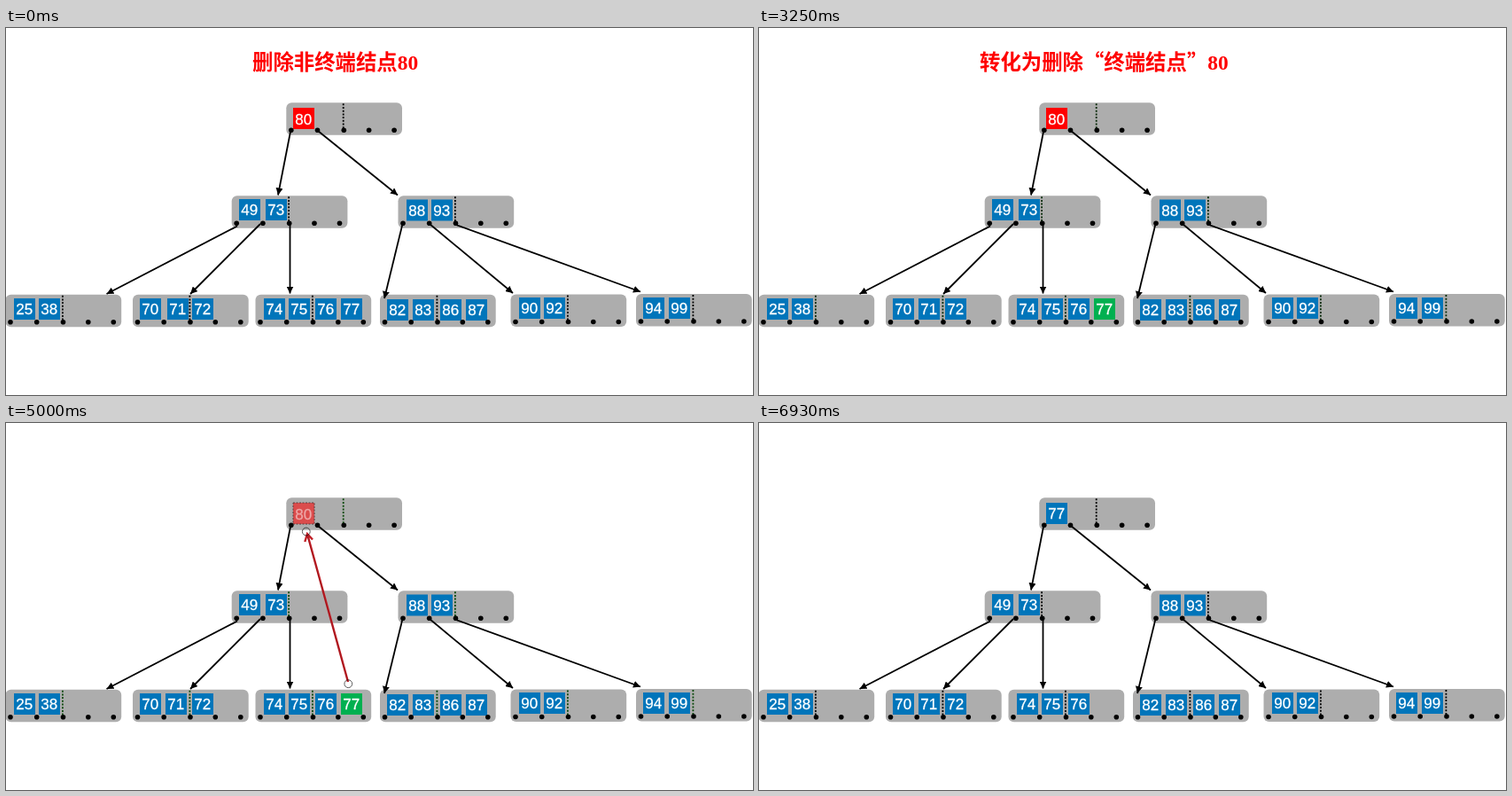
An HTML page for the animation above (9.33 s loop, 843 by 414 pixels).

```html
<!DOCTYPE html>
<html lang="zh">
<head>
<meta charset="utf-8">
<title>B-tree deletion</title>
<style>
html, body { margin: 0; width: 100%; height: 100%; overflow: hidden; background: #fff; }
svg { display: block; width: 100%; height: 100%; }
.key { font: 17px "Liberation Sans", Arial, sans-serif; fill: #fff; stroke: #fff; stroke-width: .3; text-anchor: middle; }
.title { font: bold 23.4px "Noto Sans CJK SC", "Noto Sans CJK", sans-serif; fill: #f00; }
.num { font-family: "Liberation Serif", "Noto Serif", serif; }
</style>
</head>
<body>
<svg id="stage" viewBox="0 0 843 414">
  <defs>
    <marker id="head" viewBox="0 0 8 8" refX="8" refY="4" markerWidth="8" markerHeight="8" markerUnits="userSpaceOnUse" orient="auto">
      <path d="M0 0L8 4L0 8Z"/>
    </marker>
  </defs>
  <g id="slide"></g>
  <g id="handles" fill="none" stroke="#000">
    <path id="core" d="M340 127L385.3 290" stroke-width="1"/>
    <circle cx="338.8" cy="122.5" r="4.4"/>
    <circle cx="386.3" cy="294.2" r="4.4"/>
  </g>
</svg>
<script>
const NS = "http://www.w3.org/2000/svg";
const LOOP = 9330;
const BLUE = "#0075ba", RED = "#f00", GREEN = "#00b050";
const $ = id => document.getElementById(id);
const slide = $("slide");

// x, y, cell y, keys as [value, cell x]
const nodes = [
  [316.3, 84.3, 90, [[80, 324]]],
  [254.7, 189.2, 193, [[49, 263], [73, 293]]],
  [442.5, 189.2, 193.5, [[88, 452], [93, 480]]],
  [-.5, 300.7, 305, [[25, 9], [38, 37]]],
  [143, 300.7, 305, [[70, 151], [71, 180], [72, 210]]],
  [281.5, 300.7, 305, [[74, 291], [75, 319], [76, 349], [77, 378]]],
  [422, 300.7, 306, [[82, 430], [83, 459], [86, 490], [87, 519]]],
  [569.5, 300.5, 304, [[90, 579], [92, 607]]],
  [711, 300, 304, [[94, 719], [99, 748]]]
];

const arrows = [
  "M321 117L307 188.5", "M352 116L442 188.5",
  "M261 223.5L113.5 300", "M287 221L208 300", "M320.5 221L320.5 299.5",
  "M447.5 221L427 305", "M478 221L572 299", "M508 222L716 297.5"
];

// start, first opacity, fade length, fade steps
const slides = [
  { at: 0, from: 1, span: 0, steps: 1, dots: "#000" },
  { at: 2900, from: .39, span: 350, steps: 5, dots: "#0a2c0a" },
  { at: 4640, from: .44, span: 360, steps: 5, dots: "#0c4a0c" },
  { at: 6520, from: .41, span: 410, steps: 6, dots: "#000" }
];

function add(parent, tag, attrs, text) {
  const el = document.createElementNS(NS, tag);
  for (const k in attrs) el.setAttribute(k, attrs[k]);
  if (text !== undefined) el.textContent = text;
  parent.appendChild(el);
  return el;
}

function set(el, attrs) {
  for (const k in attrs) el.setAttribute(k, attrs[k]);
}

function addTitle(x, text) {
  const el = add(slide, "text", { class: "title", x, y: 47 }, text);
  add(el, "tspan", { class: "num" }, "80");
  return el;
}

const cells = {}, seps = [];

for (const [x, y, cy, keys] of nodes) {
  add(slide, "rect", { x, y, width: 130.7, height: 36.5, rx: 6, fill: "#adadad" });
  for (const [value, cx] of keys) {
    const g = add(slide, "g", {});
    const box = add(g, "rect", { x: cx, y: cy, width: 24, height: 24, fill: BLUE });
    const label = add(g, "text", { class: "key", x: cx + 11.7, y: cy + 18.2 }, value);
    cells[value] = { g, box, label };
  }
  seps.push(add(slide, "path", {
    d: `M${x + 64.4} ${y + 1}v30`, "stroke-width": 1.8, "stroke-dasharray": "2 1.7"
  }));
  for (const dx of [5.5, 35.2, 65, 93.3, 121.8])
    add(slide, "circle", { cx: x + dx, cy: y + 31, r: 2.8 });
}

for (const d of arrows)
  add(slide, "path", { d, stroke: "#000", "stroke-width": 1.8, "marker-end": "url(#head)" });

const moveUp = add(slide, "path", {
  d: "M386 292L340 125M337.3 134L340 125L346 131.5",
  fill: "none", stroke: "#c01c24", "stroke-width": 2.4
});

const titles = [addTitle(278, "删除非终端结点"), addTitle(249, "转化为删除“终端结点”")];

const show = (el, on) => el.setAttribute("visibility", on ? "visible" : "hidden");

function pose(i) {
  titles.forEach((el, k) => show(el, k === i));
  seps.forEach(el => el.setAttribute("stroke", slides[i].dots));

  const root = cells[80], ghost = i === 2, done = i === 3;
  root.label.textContent = done ? 77 : 80;
  set(root.label, { y: done ? 108.2 : 109, opacity: ghost ? .5 : 1 });
  set(root.box, {
    fill: done ? BLUE : RED, "fill-opacity": ghost ? .56 : 1,
    stroke: ghost ? "#5a4040" : "none", "stroke-dasharray": "2 1.5"
  });

  cells[77].box.setAttribute("fill", i ? GREEN : BLUE);
  show(cells[77].g, !done);
  cells[71].g.setAttribute("transform", `translate(${i ? 0 : 2})`);
  show(moveUp, ghost);
  show($("handles"), ghost);
}

let current = -1;

function draw(t) {
  let i = slides.length - 1;
  while (t < slides[i].at) i--;
  if (i !== current) pose(current = i);

  const { at, from, span, steps } = slides[i];
  const p = span ? Math.min(1, Math.floor((t - at) / span * steps + .01) / steps) : 1;
  slide.setAttribute("opacity", from + (1 - from) * p);
  $("handles").setAttribute("opacity", 1 - .35 * p);
  $("core").setAttribute("opacity", .8 - .55 * p);
}

const start = performance.now();
function tick() {
  draw((performance.now() - start) % LOOP);
  requestAnimationFrame(tick);
}
tick();
</script>
</body>
</html>
```
